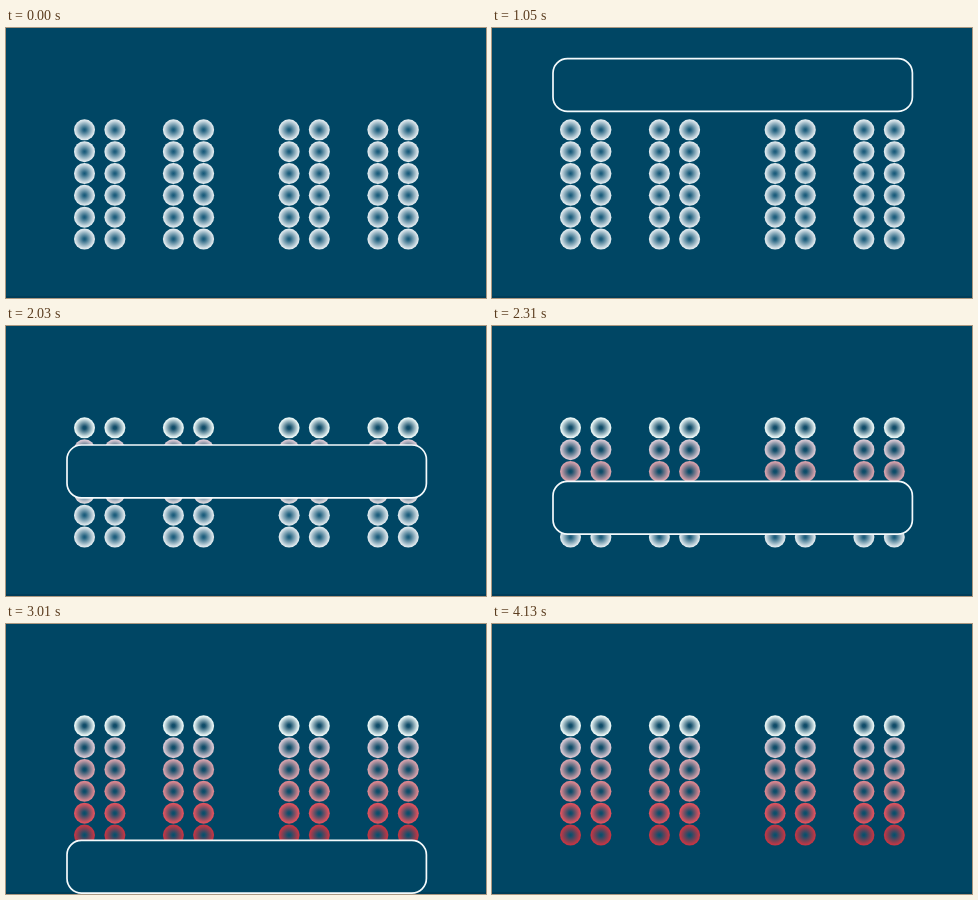
Recreate the animation shown at these times as an HTML page. Size 480 by 270 pixels, loop 4.2 s.

```html
<!DOCTYPE html>
<html lang="en">
<head>
<meta charset="utf-8">
<title>Scanner box over dot columns</title>
<style>
  html, body { margin: 0; width: 100%; height: 100%; overflow: hidden; background: #004664; }
  svg { display: block; width: 100vw; height: 100vh; }
</style>
</head>
<body>
<svg id="stage" viewBox="0 0 480 270">
  <defs id="defs"></defs>
  <rect width="480" height="270" fill="#004664"/>
  <rect y="268" width="480" height="2" fill="#003d59"/>
  <g id="dots"></g>
  <rect id="box" x="61" width="359.4" height="52.8" rx="14.5" fill="#004664" stroke="#f4fafc" stroke-width="1.7"/>
</svg>
<script>
const LOOP = 4200, STEP = 70;
const COLUMNS = [78.5, 108.9, 167.4, 197.6, 283.1, 313.3, 371.9, 402.3];
const FIRST_ROW = 101.8, ROW_GAP = 21.85, RADIUS = 10.5;
const TINTS = ['#e6f3f3', '#d6c6d1', '#d3a0aa', '#d9858e', '#dc525e', '#bf3745'];
const BOX_HEIGHT = 54;

const defs = document.getElementById('defs');
const dots = document.getElementById('dots');
const box = document.getElementById('box');
const clamp = v => Math.min(1, Math.max(0, v));
const ramp = (t, from, to) => clamp((t - from) / (to - from));

function add(parent, name, attrs) {
  const el = document.createElementNS('http://www.w3.org/2000/svg', name);
  for (const key in attrs) el.setAttribute(key, attrs[key]);
  return parent.appendChild(el);
}

function addGradient(id, stops) {
  const gradient = add(defs, 'radialGradient', { id });
  for (const [offset, color] of stops) {
    add(gradient, 'stop', { offset, 'stop-color': color });
  }
}

function addRow(y, fill) {
  const row = add(dots, 'g', { fill: `url(#${fill})` });
  for (const cx of COLUMNS) add(row, 'circle', { cx, cy: y, r: RADIUS });
  return row;
}

addGradient('plain', [[0, '#15587a'], [0.15, '#2a6784'], [0.85, '#cfdde4'], [1, '#e9f1f4']]);
const rows = TINTS.map((tint, i) => {
  const y = FIRST_ROW + i * ROW_GAP;
  addGradient('tint' + i, [[0, '#094b68'], [0.15, '#154f6b'], [0.9, tint], [1, tint]]);
  return { y, plain: addRow(y, 'plain'), tinted: addRow(y, 'tint' + i) };
});

// Constant acceleration for the first half, constant braking for the second.
const accelerate = u => u < 0.5 ? 2 * u * u : 1 - 2 * (1 - u) * (1 - u);

function draw(time) {
  const t = Math.floor((time % LOOP) / STEP) * STEP;
  const top = 18 + 215 * accelerate(ramp(t, 532, 3632));
  box.setAttribute('y', top + 0.6);
  box.setAttribute('opacity', ramp(t, 70, 450) * (1 - ramp(t, 3640, 4120)));
  for (const { y, plain, tinted } of rows) {
    const mix = clamp((top + BOX_HEIGHT - y) / 30);
    tinted.setAttribute('opacity', mix);
    plain.setAttribute('opacity', mix < 1 ? 1 : 0);
  }
}

const start = performance.now();
function tick() {
  draw(performance.now() - start);
  requestAnimationFrame(tick);
}
tick();
</script>
</body>
</html>
```
